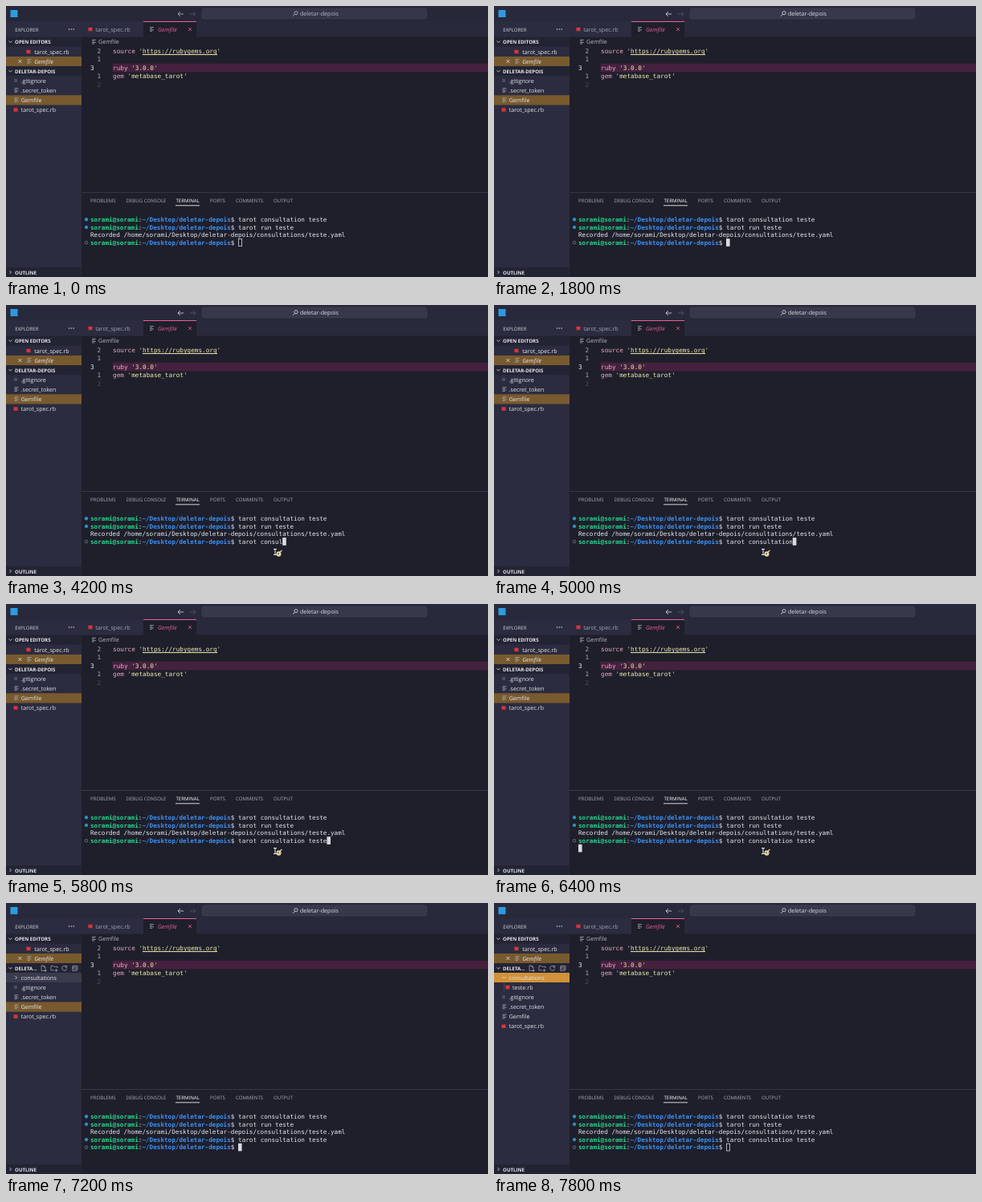
Recreate the animation shown at these times as an HTML page. Size 600 by 338 pixels, loop 8 s.

```html
<!DOCTYPE html>
<html lang="pt">
<head>
<meta charset="utf-8">
<style>
  html, body { margin: 0; width: 100%; height: 100%; overflow: hidden; background: #1e1f2b; }
  svg { display: block; width: 100vw; height: 100vh; }
  text { white-space: pre; text-rendering: geometricPrecision; }
  .ui { font: 7.1px "Open Sans", "Noto Sans", sans-serif; }
  .it { font-style: italic; }
  .tab { font: 6.1px "Open Sans", "Noto Sans", sans-serif; }
  .head { font: bold 6.15px "Open Sans", "Noto Sans", sans-serif; }
  .mono { font: 7.65px "DejaVu Sans Mono", monospace; }
  .code { font: 7.7px "DejaVu Sans Mono", monospace; }
  .bold { font-weight: bold; }
</style>
</head>
<body>
<svg id="stage" viewBox="0 0 600 338" xmlns="http://www.w3.org/2000/svg">
  <g id="fixed"></g>
  <g id="title"></g>
  <g id="files"></g>
  <g id="shell"></g>
  <g id="mouse"></g>
</svg>
<script>
const LOOP = 8000, STEP = 200;
const CHAR = 4.6, SHELL_X = 105, SHELL_Y = 266.3, LINE = 9.6, ROW = 12.15;
const WHITE = '#e6e7ed', GREY = '#a9abb9', RED = '#d8343f', PINK = '#ea5f9c', CREAM = '#f0eab0';
const BROWN = '#785a2f', ORANGE = '#d0923a', SIDE = '#2b2c3f', SECTION = '#232433', WINE = '#45213e';
const USER = 'sorami', DIR = '~/Desktop/deletar-depois', COMMAND = 'tarot consultation teste';

const el = id => document.getElementById(id);
// y is the optical middle of the line
const text = (x, y, s, fill = WHITE, cls = 'ui') =>
  `<text x="${x}" y="${y + 2.6}" fill="${fill}" class="${cls}">${s}</text>`;
const rect = (x, y, w, h, fill, extra = '') =>
  `<rect x="${x}" y="${y}" width="${w}" height="${h}" fill="${fill}" ${extra}/>`;
const line = (d, stroke = WHITE, width = 0.8) =>
  `<path d="${d}" fill="none" stroke="${stroke}" stroke-width="${width}"/>`;
const chevron = (x, y, open) =>
  line(open ? `M${x - 2} ${y - 1}l2 2 2-2` : `M${x - 1} ${y - 2}l2 2-2 2`);
const cross = (x, y, color) => line(`M${x - 2} ${y - 2}l4 4m0-4l-4 4`, color);
const ruby = (x, y) => rect(x - 2.5, y - 2.3, 5, 4.6, RED, 'rx="0.6"');
const lines = (x, y) =>
  line(`M${x - 2.5} ${y - 2.4}h5m-5 1.6h3.2m-3.2 1.6h5m-5 1.6h3.2`, GREY, 0.75);
const section = (y, name) =>
  rect(0, y - 6, 94, 12, SECTION) + text(11, y, name, WHITE, 'head');

function drawFixed() {
  const code = (y, word, string) =>
    text(133, y, `${word} <tspan fill="${CREAM}">'${string}'</tspan>`, '#eeaac4', 'code');
  const number = (x, y, n, color = GREY) => text(x, y, n, color, 'code');
  const panelTabs = [[105, 'PROBLEMS'], [149.5, 'DEBUG CONSOLE'], [211.5, 'TERMINAL'],
    [254, 'PORTS'], [286, 'COMMENTS'], [333, 'OUTPUT']];

  el('fixed').innerHTML =
    rect(0, 0, 600, 338, '#1e1f2b') +
    rect(0, 19, 94, 319, SIDE) +
    // editor tabs
    rect(94, 19, 506, 19.5, '#28293a') +
    rect(94, 19, 77, 19.5, SIDE) +
    ruby(105, 29) + text(111.3, 29, 'tarot_spec.rb', '#a4a5b4') +
    rect(171, 19, 66, 19.5, '#1e1f2b') + rect(171, 19, 66, 1, PINK) +
    lines(181.5, 29) + text(189, 29, 'Gemfile', PINK, 'ui it') + cross(229, 29, PINK) +
    lines(109.5, 44.6) + text(115, 44.6, 'Gemfile', '#b9bac6') +
    // code
    rect(132.5, 71.8, 467.5, 10.6, WINE) +
    number(113.6, 56.2, 2) + number(113.6, 66.7, 1) + number(105, 77.2, 3, '#f0f0f4') +
    number(113.6, 87.7, 1) + number(113.6, 98.2, 2, '#4b4c5e') +
    code(56.2, 'source', 'https://rubygems.org') +
    line('M170 60.6h93', CREAM, 1) +
    code(77.2, 'ruby', '3.0.0') + code(87.7, 'gem', 'metabase_tarot') +
    // explorer
    text(11.2, 29, 'EXPLORER', '#d4d5dd', 'tab') +
    [78.5, 81.3, 84.1].map(x => `<circle cx="${x}" cy="29" r="0.7" fill="${WHITE}"/>`).join('') +
    section(44.6, 'OPEN EDITORS') + chevron(5.5, 44.6, true) +
    ruby(28, 57) + text(35.3, 57, 'tarot_spec.rb') +
    rect(0, 63, 94, 12, BROWN) + cross(17.5, 69, WHITE) +
    lines(29, 69) + text(35.3, 69, 'Gemfile', WHITE, 'ui it') +
    section(332, 'OUTLINE') + chevron(5.5, 332, false) +
    // panel
    rect(94, 232, 506, 0.8, '#3c3d4e') +
    panelTabs.map(([x, s]) => text(x, 242.3, s, s === 'TERMINAL' ? '#ffffff' : GREY, 'tab')).join('') +
    rect(211, 248.4, 30, 0.9, WHITE);
}

function drawTitle(active) {
  const ink = active ? '#dfe0e6' : '#b9bac5';
  el('title').innerHTML =
    rect(0, 0, 600, 19, active ? '#28293a' : '#262737') +
    rect(5.5, 5, 9, 9, '#2c9be0') +
    line('M221 10h-7m3-3l-3 3 3 3', ink) +
    line('M229 10h7m-3-3l3 3-3 3', '#565869') +
    rect(244, 3, 280, 13, active ? '#37384a' : '#353647',
      'rx="3" stroke="#424355" stroke-width="0.6"') +
    `<circle cx="361" cy="8.7" r="2.1" fill="none" stroke="${ink}" stroke-width="0.8"/>` +
    line('M359.5 10.3l-2.5 2.6', ink) +
    text(366, 9.5, 'deletar-depois', ink);
}

function drawFiles({ folder, hover, selected, open }) {
  let out = section(81.2, hover ? 'DELETA...' : 'DELETAR-DEPOIS') + chevron(5.5, 81.2, true);
  if (hover) {
    out += line('M47 78h-3v6.5h5v-4.5l-2-2v2h2m0 3v3m-1.5-1.5h3', GREY, 0.7) +
      line('M64 81v-1.5h-4l-1-1h-3v5.5h4m2.5-2v4m-2-2h4', GREY, 0.7) +
      line('M75.2 79.5a3 3 0 1 0 .5 2.5m0-4v2.2h-2.2', GREY, 0.8) +
      line('M83 82.5v-4h6v4.5h-1m-5-2.8h-0.2v4.3h5v-4.3zm1.2 2.1h2.5', GREY, 0.7);
  }
  let y = 93;
  if (folder) {
    if (hover) out += rect(0, 87, 94, 12, selected ? ORANGE : '#3a3b4d');
    out += chevron(12.5, y, open) + text(18.5, y, 'consultations');
    y += ROW;
  }
  if (open) {
    out += line(`M12.5 ${y - 6}v12`, '#55566a', 0.6) + ruby(17, y) + text(23, y, 'teste.rb');
    y += ROW;
  }
  const entries = [
    ['.gitignore', rect(10, -2, 4, 4, '#4b4d5f')],
    ['.secret_token', lines(13, 0)],
    ['Gemfile', lines(13, 0)],
    ['tarot_spec.rb', ruby(12, 0)],
  ];
  for (const [name, icon] of entries) {
    if (name === 'Gemfile' && !selected) out += rect(0, y - 6, 94, 12.2, BROWN);
    out += `<g transform="translate(0 ${y})">${icon}</g>` + text(18.7, y, name);
    y += ROW;
  }
  el('files').innerHTML = out;
}

function drawShell({ typed, entered, done, focused }) {
  const rowY = n => SHELL_Y + n * LINE;
  const dot = (n, finished) =>
    `<circle cx="100" cy="${rowY(n)}" r="${finished ? 2.2 : 1.8}" ` +
    (finished ? 'fill="#2b8fc4"/>' : 'fill="none" stroke="#74768a" stroke-width="0.8"/>');
  const prompt = (n, command, finished = true) => dot(n, finished) + text(SHELL_X, rowY(n),
    `<tspan class="bold" fill="#22d68d">${USER}@${USER}</tspan>:` +
    `<tspan class="bold" fill="#3f92f4">${DIR}</tspan>$ ${command}`, WHITE, 'mono');

  let out = prompt(0, COMMAND) + prompt(1, 'tarot run teste') +
    text(SHELL_X, rowY(2), `Recorded /home/${USER}/Desktop/deletar-depois/consultations/teste.yaml`, WHITE, 'mono') +
    prompt(3, COMMAND.slice(0, typed), done);
  if (done) out += prompt(4, '', false);

  const column = entered ? (done ? 40 : 0) : 40 + typed;
  const x = SHELL_X + column * CHAR, y = rowY(entered ? 4 : 3) - 4.9;
  out += focused
    ? rect(x, y, CHAR, 9.6, '#d9dae0')
    : rect(x + 0.4, y + 0.4, CHAR - 0.4, 8.8, 'none', 'stroke="#d0d1d8" stroke-width="0.8"');
  el('shell').innerHTML = out;
}

function drawMouse(t) {
  if (t < 2400 || t >= 7200) { el('mouse').innerHTML = ''; return; }
  const moving = t >= 6600;
  const x = t < 6600 ? 338 : t < 6800 ? 300 : t < 7000 ? 246 : 236;
  const y = t < 6600 ? 308 : t < 7000 ? 307 : 300;
  const beam = line(`M${x - 5} ${y - 3.5}h4m-2 0v7m-2 0h4`, '#f0f0f0', 1);
  const charm = moving
    ? line(`M${x - 1} ${y - 2.5}q4-2.5 6 1.5l-5 1`, '#e4e4e4', 1.4) +
      rect(x - 3.5, y + 1.5, 9, 5.2, '#d5d7dc', 'rx="1"') +
      line(`M${x - 2} ${y + 4.2}h6`, '#6c6e7c', 0.8)
    : `<ellipse cx="${x + 1.5}" cy="${y + 2.5}" rx="3" ry="3.2" fill="#e3d3a0"/>` +
      line(`M${x + 3} ${y}l2.5-2`, '#f0dda0', 1.2) +
      rect(x, y + 1.5, 2, 1.5, '#7d6a45');
  el('mouse').innerHTML = beam + charm;
}

function typedAt(t) {
  if (t < 2400) return 0;
  if (t <= 3400) return (t - 2200) / STEP;
  return Math.min(COMMAND.length, Math.floor(6 + (t - 3400) / STEP * 1.5 + 0.5));
}

let shown = -1;
function render(now) {
  const t = Math.floor((now % LOOP) / STEP) * STEP;
  if (t !== shown) {
    shown = t;
    drawTitle(t >= 1800);
    drawFiles({ folder: t >= 6600, hover: t >= 7200, selected: t >= 7600, open: t >= 7800 });
    drawShell({
      typed: typedAt(t), entered: t >= 6000, done: t >= 6600,
      focused: t >= 1800 && t < 7600,
    });
    drawMouse(t);
  }
}

drawFixed();
render(0);
let start;
requestAnimationFrame(function tick(now) {
  start ??= now;
  render(now - start);
  requestAnimationFrame(tick);
});
</script>
</body>
</html>
```
